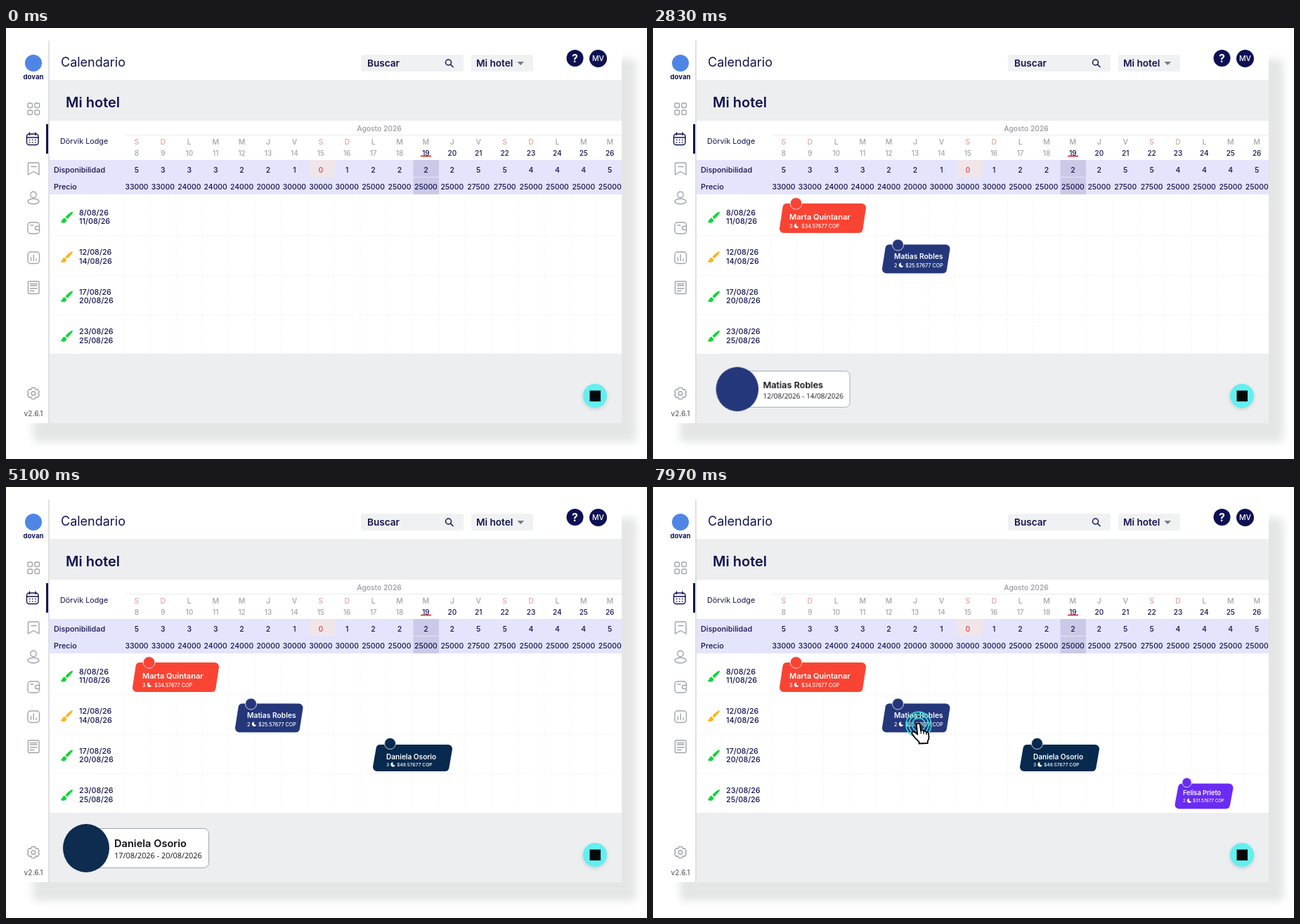
An HTML page for the animation above (8 s loop, 912 by 614 pixels).

```html
<!DOCTYPE html>
<html lang="es">
<head>
<meta charset="utf-8">
<title>Calendario</title>
<style>
html, body { margin: 0; width: 100%; height: 100%; overflow: hidden; background: #fff; }
svg { display: block; width: 912px; height: 614px; font-family: Inter, "Open Sans", sans-serif; }
.icon { fill: none; stroke: #a0a4ab; stroke-width: 1.4; stroke-linecap: round; stroke-linejoin: round; }
.date { font-family: "Open Sans", Roboto, sans-serif; }

.chip, .card, .hand { opacity: 0; animation: 8s linear infinite; }
.zoom { transform-origin: 185px 514.5px; animation: 8s linear infinite; }
#chip0 { animation-name: chip0; }
#chip1 { animation-name: chip1; }
#chip2 { animation-name: chip2; }
#chip3 { animation-name: chip3; }
#card0 { animation-name: card0; }
#card1 { animation-name: card1; }
#card2 { animation-name: card2; }
#card3 { animation-name: card3; }
#card0 .zoom { animation-name: zoom0; }
#card1 .zoom { animation-name: zoom1; }
#card2 .zoom { animation-name: zoom2; }
#card3 .zoom { animation-name: zoom3; }
.hand { animation-name: hand; }

@keyframes chip0 {
  0%, 3.25% { opacity: 0; animation-timing-function: steps(6, jump-start); }
  5.5%, 100% { opacity: 1; }
}
@keyframes chip1 {
  0%, 24.5% { opacity: 0; animation-timing-function: steps(9, jump-start); }
  27.875%, 100% { opacity: 1; }
}
@keyframes chip2 {
  0%, 45.625% { opacity: 0; animation-timing-function: steps(5, jump-start); }
  47.5%, 100% { opacity: 1; }
}
@keyframes chip3 {
  0%, 71.875% { opacity: 0; animation-timing-function: steps(5, jump-start); }
  73.75%, 100% { opacity: 1; }
}
@keyframes hand {
  0%, 97.75% { opacity: 0; animation-timing-function: steps(6, jump-start); }
  100% { opacity: 1; }
}
@keyframes card0 {
  0%, 10.125% { opacity: 0; animation-timing-function: steps(5, jump-start); }
  12%, 20.875% { opacity: 1; animation-timing-function: steps(3, jump-start); }
  22%, 100% { opacity: 0; }
}
@keyframes card1 {
  0%, 31.625% { opacity: 0; animation-timing-function: steps(5, jump-start); }
  33.5%, 41.25% { opacity: 1; animation-timing-function: steps(4, jump-start); }
  42.75%, 100% { opacity: 0; }
}
@keyframes card2 {
  0%, 55.5% { opacity: 0; animation-timing-function: steps(5, jump-start); }
  57.375%, 66.25% { opacity: 1; animation-timing-function: steps(5, jump-start); }
  68.125%, 100% { opacity: 0; }
}
@keyframes card3 {
  0%, 79.25% { opacity: 0; animation-timing-function: steps(5, jump-start); }
  81.125%, 89.625% { opacity: 1; animation-timing-function: steps(5, jump-start); }
  91.5%, 100% { opacity: 0; }
}
@keyframes zoom0 {
  0%, 10.125% { transform: scale(.905); animation-timing-function: cubic-bezier(.32, 0, .67, 0); }
  18.75%, 100% { transform: scale(1); }
}
@keyframes zoom1 {
  0%, 31.625% { transform: scale(.905); animation-timing-function: cubic-bezier(.32, 0, .67, 0); }
  39.125%, 100% { transform: scale(1); }
}
@keyframes zoom2 {
  0%, 55.5% { transform: scale(.905); animation-timing-function: cubic-bezier(.32, 0, .67, 0); }
  63.75%, 100% { transform: scale(1); }
}
@keyframes zoom3 {
  0%, 79.25% { transform: scale(.905); animation-timing-function: cubic-bezier(.32, 0, .67, 0); }
  87.125%, 100% { transform: scale(1); }
}
</style>
</head>
<body>
<svg viewBox="0 0 912 614">
  <defs>
    <filter id="soft" x="-5%" y="-5%" width="110%" height="110%"><feGaussianBlur stdDeviation="6"/></filter>
    <filter id="glow" x="-50%" y="-50%" width="200%" height="200%"><feGaussianBlur stdDeviation="2.5"/></filter>
    <path id="brush" d="M17 .8C14 1.200 9 5.800 7 8.600L9.400 11C12.300 8.800 17.300 3.700 17.400 1.400Q17.400 .7 17 .8ZM5.900 9.600C2.800 9.400 3 13.700 .3 15C3.500 18.200 9 16.600 8.600 12.300Z"/>
    <path id="moon" d="M3.600 0A3.300 3.300 0 1 0 6.800 4.300A2.900 2.900 0 0 1 3.600 0Z" fill="#fff"/>
  </defs>

  <!-- window -->
  <rect x="38" y="44" width="859" height="546" rx="8" fill="#e4e5e5" filter="url(#soft)"/>
  <rect x="18" y="18" width="858" height="545" fill="#fff"/>
  <rect x="62" y="74" width="814" height="58" fill="#edeeef"/>
  <rect x="62" y="464" width="814" height="99" fill="#edeeef"/>
  <rect x="60" y="18" width="2" height="545" fill="#e0e1e3"/>
  <rect x="62" y="188" width="814" height="49" fill="#e4e4fd"/>
  <rect x="432" y="188" width="37" height="24.500" fill="#f0e6e9"/>
  <rect x="579.500" y="188" width="36.500" height="49" fill="#cac9e7"/>
  <path d="M579.500 212.500H616" stroke="#e4e4fd"/>
  <path d="M170 152.500H876M62 131.500H876" stroke="#ececee"/>
  <path d="M590 182.500H605" stroke="#e0343c" stroke-width="1.800"/>

  <!-- top bar -->
  <rect x="505" y="38" width="146" height="24" rx="3" fill="#f0f1f2"/>
  <rect x="662" y="38" width="88" height="24" rx="3" fill="#f0f1f2"/>
  <g fill="none" stroke="#12134f" stroke-width="1.500" stroke-linecap="round">
    <circle cx="629.500" cy="49" r="4"/><path d="M632.500 52L636 55.500"/>
  </g>
  <path d="M727.500 48H737L732.200 53Z" fill="#75777c"/>
  <circle cx="809.500" cy="43" r="12" fill="#0e1055"/>
  <circle cx="842.500" cy="43.500" r="12.500" fill="#0e1055"/>

  <!-- sidebar -->
  <circle cx="39" cy="50" r="12" fill="#4f86e6"/>
  <rect x="57" y="137" width="3" height="42" fill="#12134f"/>
  <g class="icon">
    <rect x="31" y="107" width="6.500" height="6.500" rx="2"/><rect x="41" y="107" width="6.500" height="6.500" rx="2"/>
    <rect x="31" y="117" width="6.500" height="6.500" rx="2"/><rect x="41" y="117" width="6.500" height="6.500" rx="2"/>
    <path d="M31.500 193.500Q31.500 192 33 192H45.500Q47 192 47 193.500V209L39.200 204.500L31.500 209ZM36 197.500H43"/>
    <circle cx="39" cy="237.500" r="4.200"/><ellipse cx="39" cy="247" rx="8" ry="3.800"/>
    <rect x="31" y="277" width="16.500" height="16" rx="4"/><path d="M47.500 282.500H44Q41.500 282.500 41.500 285T44 287.500H47.500M35 281H39"/>
    <rect x="31" y="319" width="16.500" height="16.500" rx="4"/><path d="M35.500 327V331.500M39.200 323V331.500M43 329V331.500"/>
    <rect x="31.500" y="361" width="15.500" height="17.500" rx="1.500"/><path d="M34.500 364.500H44M34.500 367H44M34.500 371H44M34.500 374.500H40"/>
    <circle cx="39" cy="520.500" r="2.800"/>
    <path d="M36.800 512.500H41.200L42.300 515.200L45.200 514.800L47.400 518.500L45.700 520.500L47.400 522.600L45.200 526.300L42.300 525.800L41.200 528.600H36.800L35.700 525.800L32.800 526.300L30.600 522.600L32.300 520.500L30.600 518.500L32.800 514.800L35.700 515.200Z"/>
  </g>
  <g class="icon" style="stroke:#12134f">
    <rect x="29.500" y="151" width="16.500" height="15.500" rx="3.500"/>
    <path d="M29.500 156H46M33.500 149V152.500M42 149V152.500M33.500 159.500H34M37.500 159.500H38M41.500 159.500H42M33.500 163H34M37.500 163H38M41.500 163H42"/>
  </g>

  <g id="table"></g>
  <g id="stays"></g>

  <circle cx="838" cy="526" r="17" fill="#c4cdcf" filter="url(#glow)"/>
  <circle cx="838" cy="524" r="17" fill="#62f0f1"/>
  <rect x="830.500" y="516.500" width="15.500" height="15.500" fill="#05080a"/>

  <g class="hand">
    <g fill="none" stroke="#35d3cf" stroke-width="1.800">
      <circle cx="378" cy="338.500" r="18"/><circle cx="378" cy="338.500" r="14"/><circle cx="378" cy="338.500" r="9.500"/>
    </g>
    <path d="M375 339.500Q374.800 336.800 377.200 336.700T380 339.300L381 347Q384 345.500 385 348Q388 346.800 388.800 349.500Q391.800 348.800 392.200 352L392.500 357Q392.500 360 390.800 362V365L378.500 365.500V363C375 360 371 355.500 368.500 351.500Q367.500 349 370 348.600Q372.500 348.500 376.300 352.500Z" fill="#fff" stroke="#050505" stroke-width="1.800" stroke-linejoin="round"/>
    <path d="M381 347L381.500 351.500M385 348L385.400 352M388.800 349.500L389 353" stroke="#050505" stroke-width="1.300"/>
  </g>
</svg>
<script>
const NAVY = '#12134f', GRAY = '#a3a4a8';

// y is the middle of the capitals
const text = (s, x, y, size, fill = NAVY, weight = 400, anchor = 'start', cls = '') =>
  `<text class="${cls}" x="${x}" y="${y + size * .36}" font-size="${size}" fill="${fill}" font-weight="${weight}" text-anchor="${anchor}">${s}</text>`;
const mid = (s, x, y, size, fill, weight) => text(s, x, y, size, fill, weight, 'middle');

function table() {
  const week = 'LMMJVSD', free = '5333221012222554445';
  const price = [33, 33, 24, 24, 24, 20, 30, 30, 30, 25, 25, 25, 25, 27.5, 27.5, 25, 25, 25, 25];
  let out = '';
  for (let i = 0; i < 19; i++) {
    const x = 186 + 37.4 * i, d = (i + 5) % 7;
    out += `<path d="M${x - 18.7} 238V464" stroke="#f5f5f6" stroke-dasharray="3 2"/>`;
    out += mid(week[d], x, 162.500, 10.5, d > 4 ? '#dfa89f' : GRAY, 500);
    out += mid(i + 8, x, 178, 10, i < 11 ? GRAY : NAVY, 500);
    out += mid(free[i], x, 202, 10.5, free[i] === '0' ? '#e2404a' : NAVY, 500);
    out += mid(price[i] * 1000, x, 226.500, 10.4, NAVY, 500);
  }
  const dates = [['8/08/26', '11/08/26'], ['12/08/26', '14/08/26'], ['17/08/26', '20/08/26'], ['23/08/26', '25/08/26']];
  dates.forEach(([a, b], i) => {
    const y = 56.4 * i;
    out += `<use href="#brush" x="77.500" y="${261 + y}" fill="${i === 1 ? '#fbb41a' : '#0fd637'}"/>`;
    out += text(a, 104, 263 + y, 10.8, NAVY, 500) + text(b, 104, 275.5 + y, 10.8, NAVY, 500);
    if (i) out += `<path d="M62 ${239.500 + y}H876" stroke="#f3f3f4" stroke-dasharray="4 2"/>`;
  });
  return out +
    text('Calendario', 78, 48.500, 18) +
    text('Mi hotel', 85, 105.500, 20, NAVY, 600) +
    text('Buscar', 514, 50.500, 13.6, NAVY, 600) +
    text('Mi hotel', 669, 50.500, 13.6, NAVY, 600) +
    mid('?', 809.5, 43, 16, '#fff', 700) +
    mid('MV', 842.5, 43.500, 10.5, '#fff', 500) +
    mid('dovan', 39, 70, 9.6, NAVY, 700) +
    mid('v2.6.1', 39, 549, 10, '#62646a', 500) +
    mid('Agosto 2026', 531, 143, 10.3, '#97989c', 500) +
    text('Dörvik Lodge', 77, 161, 10.8) +
    text('Disponibilidad', 68, 202, 10.8, NAVY, 500) +
    text('Precio', 68, 226.500, 10.8, NAVY, 500);
}

const stays = [
  { name: 'Marta Quintanar', from: '08', to: '11', nights: 3, cost: '$34.57677', color: '#f94433', disc: '#f94433',
    x: 180, y: 250, w: 123, h: 42, tx: 194, ax: 211, ny: 269.5, sy: 282, fs: 11, ss: 7.2, bx: 203.5, by: 250, r: 8.3, big: 14.5 },
  { name: 'Matias Robles', from: '12', to: '14', nights: 2, cost: '$25.57677', color: '#25377b', disc: '#25377b',
    x: 326, y: 308.5, w: 96.5, h: 41, tx: 343, ax: 359, ny: 325.5, sy: 338, fs: 10.3, ss: 7.2, bx: 348.5, by: 309, r: 8, big: 13.8 },
  { name: 'Daniela Osorio', from: '17', to: '20', nights: 3, cost: '$48.57677', color: '#06294d', disc: '#0d2c50',
    x: 522, y: 367, w: 113, h: 38, tx: 541, ax: 556, ny: 384, sy: 395.5, fs: 10.1, ss: 6.7, bx: 546.5, by: 365.5, r: 8, big: 14.6 },
  { name: 'Felisa Prieto', from: '23', to: '25', nights: 2, cost: '$31.57677', color: '#6a2bf5', disc: '#bfabf8',
    x: 742.5, y: 422.5, w: 83, h: 36, tx: 754, ax: 768, ny: 436, sy: 447, fs: 9.2, ss: 6.1, bx: 759.5, by: 421, r: 6.7, big: 14.4 }
];

function chip(s, i) {
  const round = 6, slant = 4.5;
  const l = s.x + round, r = s.x + s.w - round, t = s.y + round, b = s.y + s.h - round;
  return `<g class="chip" id="chip${i}">
    <path d="M${l + slant} ${t}H${r}L${r - slant} ${b}H${l}Z" fill="${s.color}" stroke="${s.color}" stroke-width="${2 * round}" stroke-linejoin="round"/>
    <circle cx="${s.bx}" cy="${s.by}" r="${s.r}" fill="${s.color}" stroke="#e9e6ee" stroke-width=".9"/>
    ${text(s.name, s.tx, s.ny, s.fs, '#fff', 600)}
    ${text(s.nights, s.tx, s.sy, s.ss, '#fff', 500)}
    <use href="#moon" x="${s.tx + s.ss * .9}" y="${s.sy - 3.5}"/>
    ${text(s.cost + ' COP', s.ax, s.sy, s.ss, '#fff', 500)}
  </g>`;
}

function card(s, i) {
  return `<g class="card" id="card${i}"><g class="zoom">
    <rect x="114" y="486.500" width="174.500" height="56" rx="7" fill="#fff" stroke="#9aa6b0"/>
    <ellipse cx="114" cy="514.500" rx="33" ry="34.500" fill="${s.disc}"/>
    ${text(s.name, 154, 508, s.big, '#141418', 600)}
    ${text(`${s.from}/08/2026 - ${s.to}/08/2026`, 154, 525, 10.9, '#141418', 500, 'start', 'date')}
  </g></g>`;
}

document.getElementById('table').innerHTML = table();
document.getElementById('stays').innerHTML = stays.map(chip).join('') + stays.map(card).join('');
</script>
</body>
</html>
```
